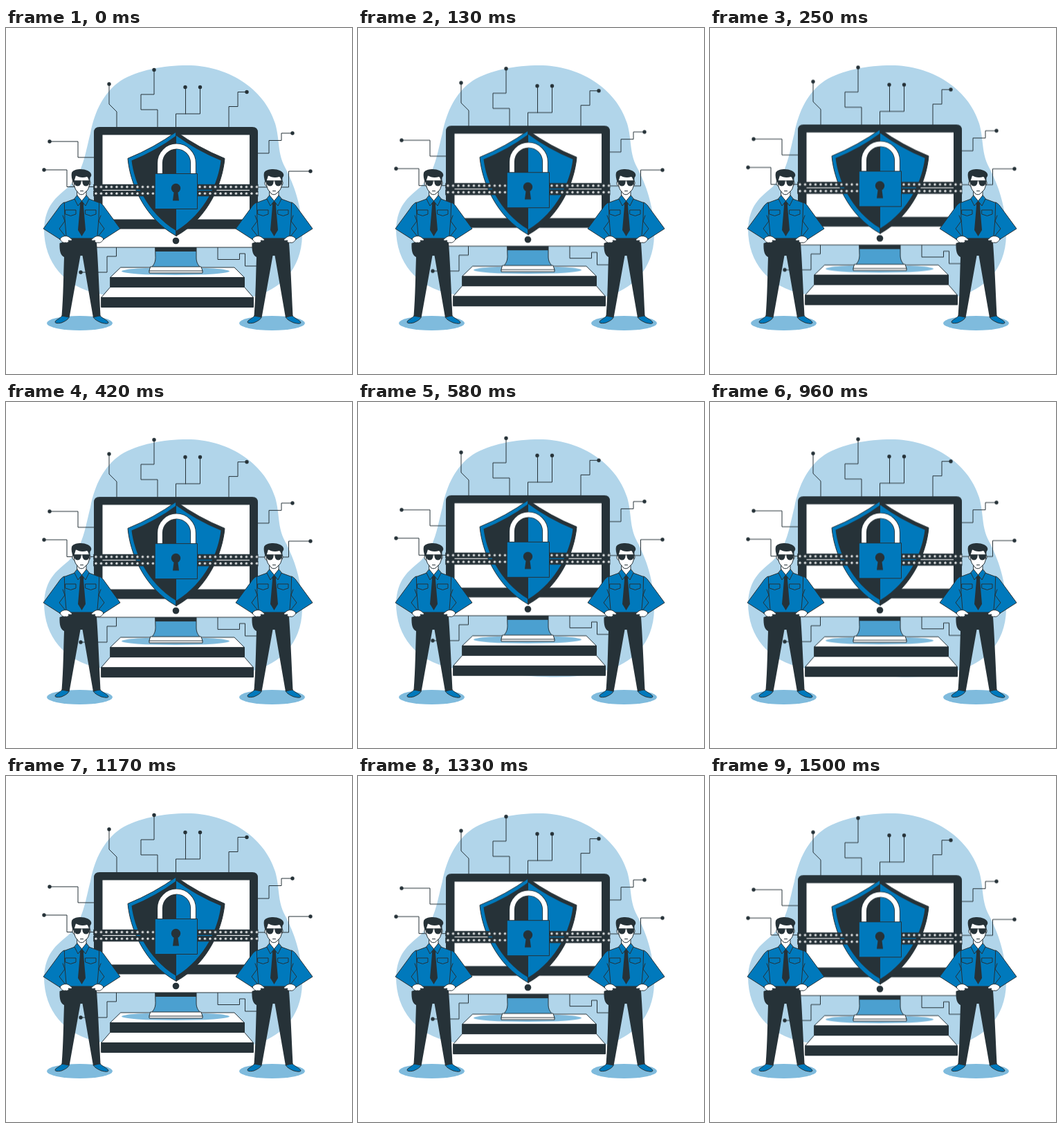
An HTML page that plays this animation: 500 by 500 pixels, repeating every 1.54 s.

```html
<!DOCTYPE html>
<html lang="en">
<head>
<meta charset="utf-8">
<title>Guarded computer</title>
<style>
  html, body { margin: 0; width: 100%; height: 100%; overflow: hidden; background: #fff; }
  svg { display: block; width: 100%; height: 100%; }
  .blue { fill: #0079bc; }
  .dark { fill: #263238; }
  .white { fill: #fff; }
  .pale { fill: #7fbbdd; }
  .line { stroke: #263238; stroke-width: 1; stroke-linejoin: round; stroke-linecap: round; }
  .none { fill: none; }
  .float { animation: float 1540ms -6ms infinite; }
  /* 37 even steps: up, down, then one hold */
  @keyframes float {
    0% { transform: translateY(0); animation-timing-function: steps(17, end); }
    45.946% { transform: translateY(-10px); animation-timing-function: steps(19, end); }
    97.297%, 100% { transform: translateY(.3px); animation-timing-function: steps(1, end); }
  }
</style>
</head>
<body>
<svg viewBox="0 0 500 500">
  <defs>
    <pattern id="links" x="126.2" y="225.6" width="7.5" height="9.5" patternUnits="userSpaceOnUse">
      <rect class="dark" width="7.5" height="8.4"/>
      <circle cx="3.8" cy="4" r="1.6" fill="#fff"/>
      <circle cx="4.2" cy="4.300" r=".7" fill="#a5abae"/>
    </pattern>

    <g id="arm">
      <path class="blue line" d="M84 252 C80 254 78 257 76 260 L54 290 L79 306 L87 300 L85 276 Z"/>
      <path class="none line" d="M82 271 L85 279 L77 290 L85 300"/>
      <path class="white line" d="M78 305 C80 301 85 300 89 301 C92 302 93 304 96 306 C95 308 92 307 90 307 C92 309 89 311 86 310 C83 311 80 309 78 305Z"/>
    </g>
    <path id="pocket" class="none line" d="M86 263 H101 V269 L93.5 271.5 L86 269Z"/>
    <path id="lens" class="dark" d="M98 220.500 H108.500 C109 225 107 228.500 103.500 228.500 C100 228.500 98 225 98 220.500Z"/>

    <g id="guard">
      <ellipse class="pale" cx="106.5" cy="426.5" rx="47.5" ry="10.5"/>
      <path class="blue line" d="M81 416 L91 417 C91 421 85 424 80 426 C76 427 71 427 71 425 C71 422 78 420 81 416Z"/>
      <path class="blue line" d="M136 416 L126 417 C127 421 133 424 138 426 C142 427 147 428 148 426 C148 423 140 420 136 416Z"/>
      <path class="dark" d="M86 304 H130.500 C133 335 134.500 375 136.500 416 L126 418.500 L110.500 329 H107.500 L91.500 418.500 L80.500 416.500 C83 385 83 358 84 331 C79 329 77 322 77.500 311 L86 308Z"/>
      <path class="blue line" d="M83 253 L102 246 H117 L136 253 C139 268 135 288 133 304 H87 C84 288 80 268 83 253Z"/>
      <use href="#arm"/>
      <use href="#arm" transform="matrix(-1 0 0 1 219 0)"/>
      <use href="#pocket"/>
      <use href="#pocket" x="29"/>
      <path class="white line" d="M103 234 H116 V245 L109.5 251 L103 245Z"/>
      <path class="dark" d="M106 250 H113 L112 257 L115 292 L109.5 301 L104 292 L107 257Z"/>
      <path class="blue line" d="M103 242 L109.5 250 L104 257 L99 247Z M116 242 L109.5 250 L115 257 L120 247Z"/>
      <path class="white line" stroke-width=".7" d="M98 221 C95 220 95 228 99 229Z M120 221 C123 220 123 228 119 229Z"/>
      <path class="white line" d="M98 213 H121 C121 222 121 229 118 234 L112 240 C110 241 108 241 106 240 L101 234 C98 229 98 222 98 213Z"/>
      <path class="dark" d="M97 224 C95 218 94 213 95 209 C97 205 103 204 108 204 C115 204 122 207 123 211 C124 214 122 215 121 217 L120.500 222 C119 219 119 216 117 215 C111 217 105 216 101 213 C100 217 99 220 97 224Z"/>
      <use href="#lens"/>
      <use href="#lens" transform="matrix(-1 0 0 1 219 0)"/>
      <path class="none line" d="M97.500 221 H121.500"/>
      <path class="none line" stroke-width=".7" d="M107.500 235.500 H111.500"/>
    </g>

    <path id="half" d="M246 150 Q214 173 176 188.500 C179 222 198 274 246 300.500Z"/>
    <path id="core" d="M246 155.500 Q217 177 181.500 191.500 C185 222 203 267 246 293Z"/>
  </defs>

  <path fill="#b1d5ea" d="M262 54 C318 54 373 86 389 138 C396 163 392 180 403 201 C417 228 428 258 428 300 C427 350 395 378 358 388 C325 398 290 399 250 396 C200 392 160 389 134 384 C85 374 55 340 55 290 C57 256 72 245 90 230 C112 210 115 178 122 152 C128 120 142 92 166 76 C190 61 228 54 262 54Z"/>

  <g class="float">
    <path class="none line" d="M149 81 V110 L160 121 V144 M214 60.500 V96 H195 V118 H219 V144 M259.500 85.500 V124 M280.500 85.500 V124 H245.500 V151 M348 92.500 H335 V113.500 H322 V144 M414 152 H398 V162.500 H380 V181 H364 M440 207 H408.500 V230 H364 M63 164 H104 V187 H128 M55 205 H88 V229.500 H128 M108 353 H146 V330 H159.500 V317 M306 317 V334.500 H337.500 V326 H345.500 V344 H364"/>
    <g id="nodes" class="dark"></g>

    <path class="white line" d="M166 346 H330 L344.500 360.500 H151Z M151 374.500 H344.500 L357.500 389.500 H138Z"/>
    <path class="dark line" d="M151 360.500 H344.500 V374.500 H151Z M138 389.500 H357.500 V403.500 H138Z"/>
    <ellipse class="pale" cx="245" cy="351.500" rx="78" ry="5.500"/>

    <path class="line" fill="#4ba0d0" d="M216 317 H275 V332 C275 338 277 342 281 346 H210 C214 342 216 338 216 332Z"/>
    <path class="dark" d="M216 317 H275 V323 H216Z"/>
    <path class="white line" d="M209 345 H282 L284 351 V354 H207 V351Z M207 351 H284"/>
    <path class="dark" d="M135 143 H356 Q364 143 364 151 V292 H127 V151 Q127 143 135 143Z"/>
    <path class="white" d="M139.500 154.500 H352 V276.500 H139.500Z"/>
    <path class="white line" d="M127.500 290 H363.500 V312.500 Q363.500 317 359 317 H132 Q127.500 317 127.500 312.500Z"/>
    <circle class="dark" cx="245.500" cy="307.500" r="4.800"/>

    <use href="#half" class="blue line"/>
    <use href="#core" class="dark"/>
    <g transform="matrix(-1 0 0 1 492 0)">
      <use href="#half" class="dark line"/>
      <use href="#core" class="blue"/>
    </g>
    <path fill="url(#links)" d="M126.200 225.600 H364.500 V243.500 H126.200Z"/>

    <g fill="none">
      <path stroke="#263238" stroke-width="8.500" d="M222.500 211 V195 A24 24 0 0 1 270.500 195 V211"/>
      <path stroke="#fff" stroke-width="6.800" d="M222.500 211 V195 A24 24 0 0 1 270.500 195 V211"/>
    </g>
    <path class="blue line" d="M215.500 210.500 H276.500 V261.500 H215.500Z"/>
    <circle class="dark" cx="245.500" cy="231.500" r="6.700"/>
    <path class="dark" d="M243 234 H248 L250 249.500 H241Z"/>
  </g>

  <use href="#guard"/>
  <use href="#guard" x="278"/>
</svg>
<script>
  const nodes = [[149, 81], [214, 60.5], [259, 85.5], [280.5, 85.5], [348, 92.5],
    [414, 152], [440, 207], [63, 164], [55, 205], [108, 353]];
  document.getElementById('nodes').innerHTML =
    nodes.map(([x, y]) => `<circle cx="${x}" cy="${y}" r="2.7"/>`).join('');
</script>
</body>
</html>
```
